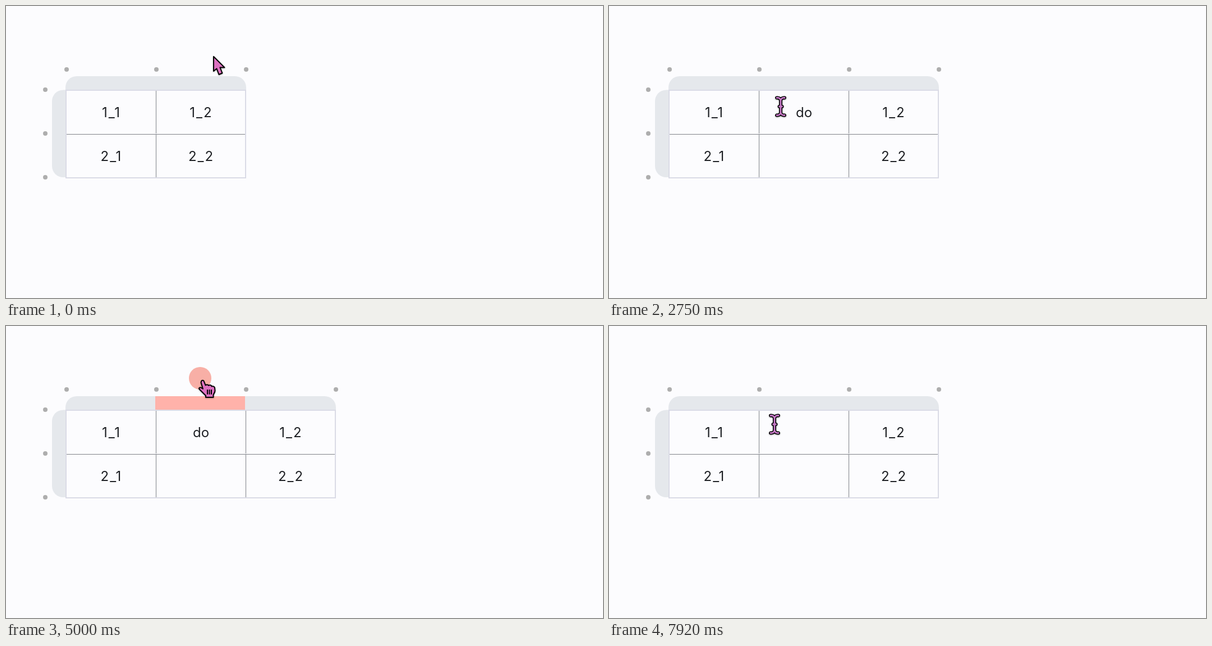
Animation, 1064 px wide and 520 px high, one loop 8000 ms. Source, as an HTML page:

```html
<!DOCTYPE html>
<html lang="en">
<head>
<meta charset="utf-8">
<title>Table editing</title>
<style>
  html, body { margin: 0; width: 100%; height: 100%; overflow: hidden; background: #fcfcfe; }
  svg { display: block; width: 100%; height: 100%; }
  text { font: 24px Inter, sans-serif; fill: #1d1f23; text-anchor: middle; }
  .label { letter-spacing: 2px; }
  .dot { fill: #aeaeae; }
  .bar { fill: #e5e8ec; }
  .rule { stroke: #808389; stroke-width: 1; }
  .frame { fill: none; stroke: #dadbe6; stroke-width: 2; }
  .pointer { fill: #dd70c0; stroke: #000; stroke-width: 2; stroke-linejoin: round; stroke-linecap: round; }
  .beam { fill: none; stroke-linecap: round; stroke-linejoin: round; }
  #cursor { filter: drop-shadow(0 1px 1px rgba(0, 0, 0, .3)); }
</style>
</head>
<body>
<svg viewBox="0 0 1064 520">
  <defs>
    <path id="beam" d="M-7-15.500C-3-16 0-14 0-10V10C0 14-3 16-7 15.500M7-15.500C3-16 0-14 0-10M0 10C0 14 3 16 7 15.500M-2.500 0H2.500"/>
  </defs>
  <path class="bar" d="M107 149.500H102a20 20 0 0 0-20 20V285a20 20 0 0 0 20 20h5z"/>
  <path class="bar" id="header"/>
  <rect id="hover" x="266" y="125" width="160" height="25" fill="#c5d0e8"/>
  <rect id="danger" x="266" y="125" width="160" height="25" fill="#ffb2aa"/>
  <g class="dot">
    <circle cx="70" cy="149" r="4"/><circle cx="70" cy="227" r="4"/><circle cx="70" cy="305" r="4"/>
    <circle cx="108" cy="113" r="4"/><circle cx="268" cy="113" r="4"/><circle cx="428" cy="113" r="4"/>
    <circle id="lastDot" cx="588" cy="113" r="4"/>
  </g>
  <rect class="frame" id="frame" x="107" y="150" height="156"/>
  <path class="rule" id="rowRule"/>
  <path class="rule" d="M267.500 151V227M267.500 229V305"/>
  <path class="rule" id="extraRule" d="M427.500 151V227M427.500 229V305"/>
  <g class="label">
    <text x="188" y="198">1_1</text>
    <text x="188" y="276">2_1</text>
    <g id="lastColumn">
      <text x="348" y="198">1_2</text>
      <text x="348" y="276">2_2</text>
    </g>
  </g>
  <text id="typed" x="347.500" y="198"></text>
  <rect id="caret" width="2" height="28" fill="#1d1f23"/>
  <rect id="insertLine" x="266" y="113" width="4" height="194" fill="#0058fa"/>
  <g id="insertButton">
    <circle r="22" fill="#0058fa"/>
    <path d="M-12 0H12M0-12V12" stroke="#fff" stroke-width="4"/>
  </g>
  <circle id="deleteButton" cx="346" cy="93" r="20" fill="#f8afa6"/>
  <g id="cursor">
    <path class="pointer" id="arrow" d="M1 2V28L6.500 23.500 10.500 34 16.500 31.500 12.500 21.500H20.500Z"/>
    <g id="hand">
      <path class="pointer" d="M-1.500.5C.5-1 2.500 0 3 2L5.500 8.500C7 7 10 7 11 9 13 7.500 16 8 16.500 10.500 19 9.500 21.500 11 22 13L22.500 18C22.500 22 20 23 19.500 26V30H6V27C3 24-1 20-5 16-7 14-5 11.500-2 13L1 15-2.500 3.500Z"/>
      <path class="pointer" d="M9 17v7M12.500 17v7M16 17v7"/>
    </g>
    <g id="ibeam" class="beam">
      <use href="#beam" stroke="#000" stroke-width="6"/>
      <use href="#beam" stroke="#c87ac8" stroke-width="2.800"/>
    </g>
  </g>
</svg>
<script>
const LOOP = 8000, TICK = 1000 / 12;
const el = id => document.getElementById(id);
const set = (id, attrs) => {
  for (const [name, value] of Object.entries(attrs)) el(id).setAttribute(name, value);
};
const show = (id, opacity) => set(id, { opacity: Number(opacity) });

// Moves: first tick, last tick, destination.
const moves = [
  [1, 4, 299, 104], [6, 9, 267, 118], [15, 15, 280, 132], [17, 18, 316, 190],
  [33, 33, 306, 179], [34, 34, 308, 179], [37, 39, 411, 51], [41, 45, 380, 113],
  [47, 50, 352, 146], [52, 52, 350, 148], [57, 60, 350, 97], [62, 66, 359, 101],
  [91, 95, 295, 175]
];
const shapes = [
  [0, 'arrow'], [7, 'hand'], [17, 'ibeam'], [25, ''], [33, 'ibeam'], [38, 'arrow'],
  [47, 'hand'], [62, 'arrow'], [91, 'hand'], [93, 'ibeam']
];
// Carets: on tick, off tick, x, row.
const carets = [
  [14, 17, 348, 1], [18, 24, 348, 0], [25, 26, 355, 0], [26, 33, 361, 0],
  [39, 45, 361, 0], [50, 54, 361, 0], [77, 83, 348, 1], [85, 91, 348, 0]
];

function cursorAt(n) {
  let x = 369, y = 88;
  for (const [a, b, toX, toY] of moves) {
    if (n < a) break;
    const p = Math.min(1, (n - a + 1) / (b - a + 1));
    const eased = p * (2 - p);
    x += (toX - x) * eased;
    y += (toY - y) * eased;
  }
  return [x, y];
}

function render(n) {
  const ramp = (a, b = a) => Math.max(0, Math.min(1, (n - a + 1) / (b - a + 1)));

  const wide = (n >= 14 && n < 62) || n >= 77;
  const right = wide ? 588 : 428;
  set('header', { d: `M106 150V145a20 20 0 0 1 20-20H${right - 20}a20 20 0 0 1 20 20v5z` });
  set('frame', { width: right - 108 });
  set('rowRule', { d: `M108 228.500H${right - 2}` });
  set('lastColumn', { transform: `translate(${wide ? 160 : 0} 0)` });
  show('extraRule', wide);
  show('lastDot', wide);

  el('typed').textContent = wide && n < 85 ? 'do'.slice(0, Math.max(0, n - 24)) : '';
  const caret = carets.find(([on, off]) => n >= on && n < off);
  show('caret', Boolean(caret));
  if (caret) set('caret', { x: caret[2] - 1, y: 175 + 78 * caret[3] });

  const grown = ramp(6, 9) - .39 * ramp(15) - .61 * ramp(17, 18);
  set('insertButton', {
    transform: `translate(268 113) scale(${(4 + 18 * grown) / 22})`,
    opacity: Math.min(1, grown * 3)
  });
  show('insertLine', ramp(6, 9) - ramp(17, 18));

  show('hover', ramp(47, 52) - ramp(62) + ramp(91, 92) - ramp(93, 95));
  show('danger', ramp(59, 60) - ramp(62));
  show('deleteButton', ramp(54, 55) - ramp(62));

  const [x, y] = cursorAt(n);
  const shape = shapes.filter(([from]) => n >= from).pop()[1];
  set('cursor', { transform: `translate(${x.toFixed(1)} ${y.toFixed(1)})` });
  for (const id of ['arrow', 'hand', 'ibeam']) show(id, id === shape);
}

const start = performance.now();
function frame() {
  const time = (performance.now() - start) % LOOP;
  render(Math.floor((time + 4) / TICK) % 96);
  requestAnimationFrame(frame);
}
frame();
</script>
</body>
</html>
```
